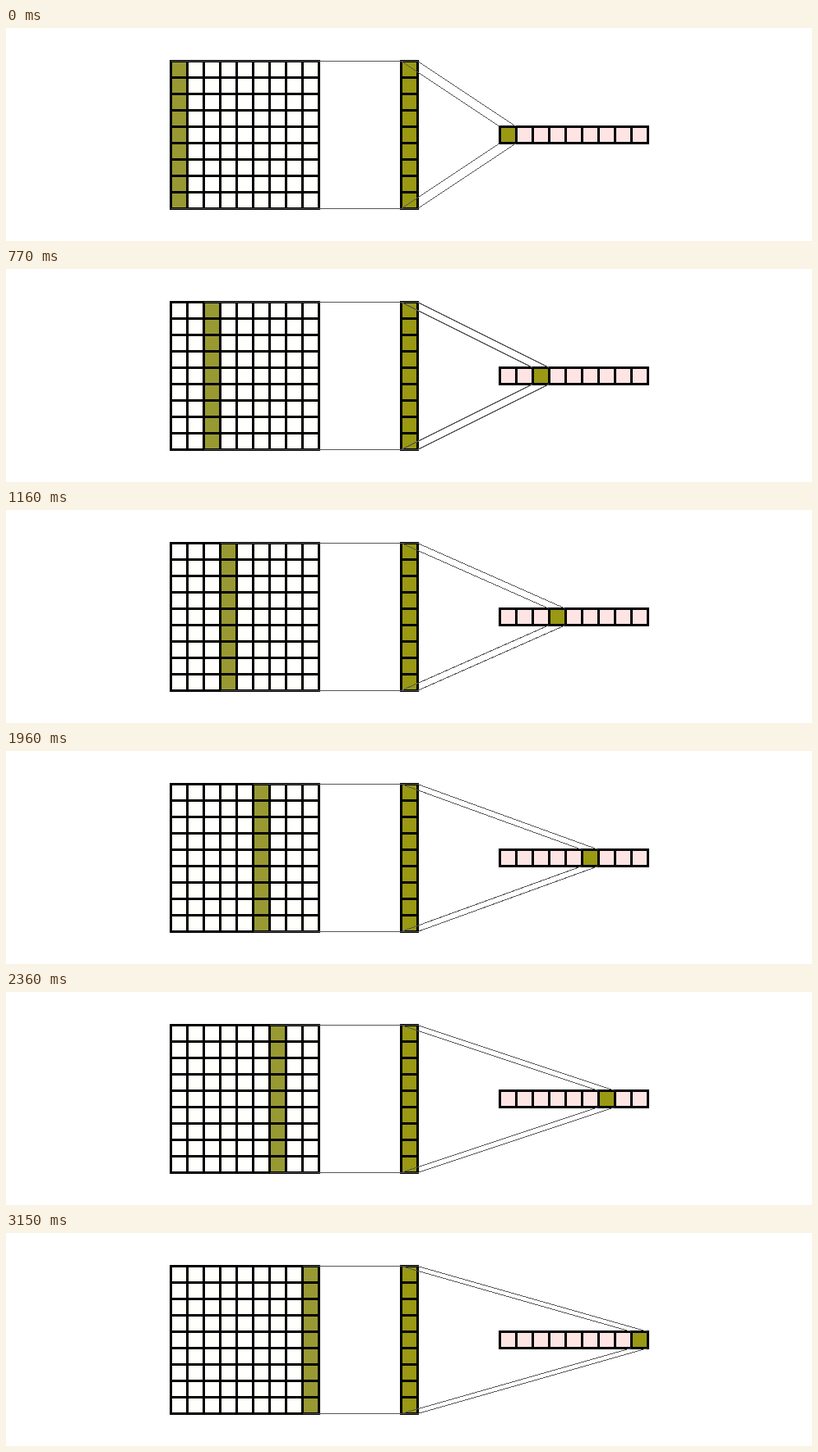
An HTML page that plays this animation: 980x260 px, repeating every 3.52 s.

```html
<!DOCTYPE html>
<html lang="en">
<head>
<meta charset="utf-8">
<title>Column projection</title>
<style>
  html, body { margin: 0; width: 100%; height: 100%; overflow: hidden; background: #fff; }
  svg { display: block; width: 980px; height: 260px; }
  .cell { stroke: #000; stroke-width: 3; stroke-linejoin: round; }
  .guide { stroke: #555; stroke-width: 1; fill: none; }
</style>
</head>
<body>
<svg viewBox="0 0 980 260" shape-rendering="crispEdges">
  <g id="cells" transform="translate(.5 .5)"></g>
  <path id="guides" class="guide" transform="translate(.5 .5)"/>
</svg>
<script>
const SIZE = 20, COUNT = 9, LOOP = 3520;
const TOP = 40, BOTTOM = TOP + SIZE * COUNT;
const GRID_X = 200, KERNEL_X = 480, OUT_X = 600, OUT_Y = 120;
const STARTS = [0, 370, 770, 1160, 1560, 1960, 2360, 2760, 3150];

const cells = document.getElementById('cells');
const guides = document.getElementById('guides');

function addCells(x, y, columns, rows, fill) {
  return Array.from({ length: columns * rows }, (_, i) => {
    const column = i % columns;
    const rect = document.createElementNS('http://www.w3.org/2000/svg', 'rect');
    const attributes = {
      x: x + column * SIZE,
      y: y + Math.floor(i / columns) * SIZE,
      width: SIZE, height: SIZE, fill, class: 'cell'
    };
    for (const name in attributes) rect.setAttribute(name, attributes[name]);
    cells.append(rect);
    return { rect, column };
  });
}

const grid = addCells(GRID_X, TOP, COUNT, COUNT, '#fffffb');
addCells(KERNEL_X, TOP, 1, COUNT, '#999914');
const output = addCells(OUT_X, OUT_Y, COUNT, 1, '#ffe4e4');

function highlight(list, active, on, off) {
  for (const { rect, column } of list) {
    rect.setAttribute('fill', column === active ? on : off);
  }
}

// Joins the active column, the kernel and the output cell.
function guidePath(step) {
  const offset = step * SIZE;
  return [0, SIZE].flatMap(side =>
    [[TOP, OUT_Y], [BOTTOM, OUT_Y + SIZE]].map(([y, outY]) =>
      `M${GRID_X + offset + side} ${y}H${KERNEL_X + side}L${OUT_X + offset + side} ${outY}`
    )).join('');
}

let shown = -1;
function draw(time) {
  const t = time % LOOP;
  const step = STARTS.filter(start => start <= t).length - 1;
  if (step !== shown) {
    shown = step;
    highlight(grid, step, '#999933', '#fffffb');
    highlight(output, step, '#999914', '#ffe4e4');
    guides.setAttribute('d', guidePath(step));
  }
}

const begin = performance.now();
function tick() {
  draw(performance.now() - begin);
  requestAnimationFrame(tick);
}
tick();
</script>
</body>
</html>
```
